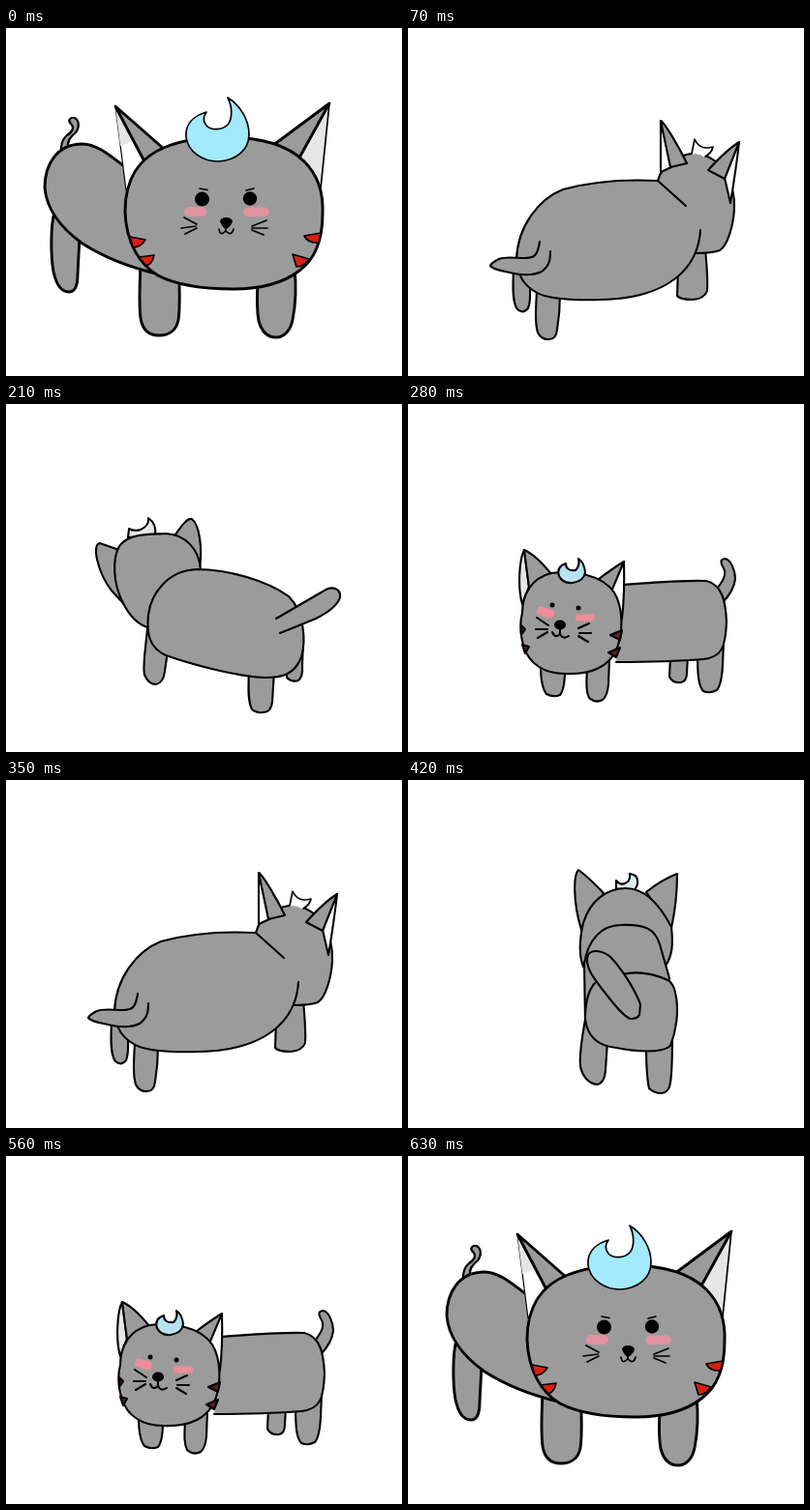
Animation, 409 px wide and 360 px high, one loop 0.7 s. Source, as an HTML page:

```html
<!DOCTYPE html>
<html lang="en">
<head>
<meta charset="utf-8">
<title>Turning cat</title>
<style>
  html, body { margin: 0; width: 100%; height: 100%; overflow: hidden; background: #fff; }
  svg { display: block; width: 409px; height: 360px; }
  .pose { opacity: 0; fill: #9b9b9b; stroke: #000; stroke-width: 2.1; stroke-linecap: round; stroke-linejoin: round; }
  #front { stroke-width: 2.9; opacity: 1; }
  .white { fill: #fff; }
  .pale { fill: #e6e6e6; }
  .line { fill: none; }
  .thin { stroke-width: 1.7; }
  .hair { stroke-width: 1.2; }
  .ink { fill: #000; stroke: none; }
  .blush { fill: #e2929f; stroke: none; }
  .bare { stroke: none; }
</style>
</head>
<body>
<svg viewBox="0 0 409 360">
  <g id="front" class="pose">
    <path d="M50 190C46 205 46 235 49 252C52 266 57 273 65 273C72 273 74 266 74 255L76 216"/>
    <path d="M139 244C138 270 137 285 139 300C141 313 148 318 158 318C168 318 176 313 178 302C180 290 179 275 179 260"/>
    <path d="M260 263C259 280 259 292 261 303C264 314 270 320 279 320C288 320 294 312 296 302C299 287 300 268 298 248"/>
    <path style="stroke-width:2.2" d="M57 130C56 120 58 115 63 111C69 107 71 103 67 99C63 95 67 92 71 93C76 96 76 103 72 108C66 113 63 117 64 125"/>
    <path d="M122 143C105 130 93 120 79 120C52 120 40 142 40 165C42 190 61 210 79 223C104 239 130 248 155 254"/>
    <path class="white hair" d="M113 81L124 168L145 140Z"/>
    <path class="pale bare" d="M113 81L118 122L132 117Z"/>
    <path d="M113 81L163 125L145 142Z"/>
    <path class="pale thin" d="M334 78L302 134L325 166Z"/>
    <path d="M334 78L275 122L302 136Z"/>
    <path d="M123 190C123 150 142 132 165 123C185 115 205 113 226 113C262 113 290 120 308 138C322 152 328 170 327 192C327 222 318 240 303 251C285 265 262 270 235 270C205 270 178 267 157 256C138 245 124 222 123 190Z"/>
    <path class="thin" fill="#a3eaff" d="M207 87C193 91 185 100 186 113C188 128 203 138 219 138C238 137 251 126 251 110C251 95 242 80 229 72C234 82 234 94 229 100C223 106 212 106 207 101C203 96 204 91 207 87Z"/>
    <g class="ink">
      <circle cx="202.500" cy="177" r="7.500"/>
      <circle cx="252" cy="176.500" r="7.200"/>
      <path d="M221 200Q222 196 227 196Q233 196 234 200Q232 206 227 208Q223 206 221 200Z"/>
    </g>
    <g class="blush">
      <rect x="184" y="185" width="23" height="10" rx="5"/>
      <rect x="245" y="185.500" width="27" height="9.500" rx="4.700"/>
    </g>
    <path class="line thin" d="M200 166L208 167.500M248 168L256 166M227 207V210M220 208Q221 216 227 210Q233 216 235 208M184 196L197 203M181 207L196 205M185 213L197 207M254 205L269 199M254 207L270 207M254 209L266 214"/>
    <path class="thin" fill="#d91f10" d="M128 216L144 219Q139 227 131 227ZM137 237L153 235Q151 244 145 246ZM325 212L308 215Q312 223 323 222ZM296 234L313 239Q308 247 300 247Z"/>
  </g>

  <g id="backRight" class="pose">
    <path d="M109 250C108 270 108 285 113 291Q119 296 124 290C127 283 126 277 126 265"/>
    <path d="M133 272C132 290 131 305 134 315Q138 323 146 322Q153 322 154 312C156 300 157 290 157 275"/>
    <path d="M281 232C278 255 278 270 278 277Q281 281 294 281Q306 280 309 272C310 255 308 245 307 226"/>
    <path d="M258 158C262 140 285 128 300 130C325 135 338 160 337 187C336 205 330 225 322 230C315 233 305 233 295 233"/>
    <path class="bare" d="M258 158L287 184L302 209L296 233L250 220Z"/>
    <path d="M287 184L258 158C220 156 185 160 160 167C135 177 113 205 112 240C113 262 128 276 150 279C170 282 215 283 240 276C275 267 300 245 302 209"/>
    <path class="white" d="M261 96L261 149L272 144Z"/>
    <path d="M261 96C265 98 280 123 288 140L271 144Z"/>
    <path class="white" d="M342 118L327 155L333 181Q339 145 342 118Z"/>
    <path d="M342 118Q329 126 310 147L327 156Z"/>
    <path class="white bare" d="M293 131L296 115Q301 127 315 123Q314 129 307 134Q300 129 293 131Z"/>
    <path class="line thin" d="M293 130L296 115Q301 127 315 123Q314 129 307 133"/>
    <path d="M136 221C134 236 130 238 120 238C112 238 100 236 94 239Q86 243 85 246C88 250 96 251 105 253C118 256 130 256 138 252C146 246 147 240 147 231"/>
  </g>

  <g id="back" class="pose">
    <path d="M183 248C179 270 177 285 178 296C180 307 187 314 195 315Q203 314 204 300L206 270"/>
    <path d="M246 274C246 297 247 310 249 319Q254 324 262 324Q270 323 271 313C273 300 273 285 273 265"/>
    <path d="M176 93C171 98 170 125 179 155L202 117Q187 101 176 93Z"/>
    <path d="M278 97Q262 103 246 116L272 153C276 135 278 115 278 97Z"/>
    <path fill="#d9edf3" d="M215 115L215 104Q219 109 224 107Q230 105 229 97Q237 98 237 104Q238 109 233 115Z"/>
    <path d="M181 193C176 180 177 165 181 148C188 125 205 112 225 112C243 112 259 127 272 152C274 170 273 182 266 192"/>
    <path d="M183 250L182 190C186 165 200 150 220 150C245 149 255 154 260 170L270 205L262 225"/>
    <path d="M222 201C237 197 257 201 270 208Q275 213 276 220C281 240 276 262 271 275C262 283 235 281 215 277C195 275 185 265 183 247C183 230 186 218 193 210"/>
    <path d="M186 181C190 174 203 177 210 184C222 197 235 218 240 232L239 243Q237 247 230 247C225 246 215 235 205 222C193 207 181 192 186 181Z"/>
  </g>

  <g id="backLeft" class="pose">
    <path d="M146 232C144 255 141 270 143 280Q147 290 155 290Q163 288 164 276L167 256"/>
    <path d="M251 276C250 295 250 308 254 316Q259 320 265 319Q274 319 275 308L277 276"/>
    <path d="M289 268L290 283Q295 288 302 286Q307 282 306 270L307 245"/>
    <path d="M117 151L97 144C88 145 95 175 109 193L121 206Z"/>
    <path d="M175 135C182 125 187 118 192 119C200 125 203 150 200 170Z"/>
    <path class="pale" d="M126 138L127 129Q132 132 139 130Q148 126 147 118Q156 124 154 136Z"/>
    <path d="M146 231Q131 226 121 206C110 185 110 160 117 147C127 133 150 135 165 134C185 135 200 150 201 172"/>
    <path d="M197 171C230 171 270 183 292 199C308 215 310 245 305 262C298 280 285 283 268 283C235 282 185 267 165 260C148 252 145 238 147 218C150 195 168 172 197 171Z"/>
    <path d="M279 222L327 194C337 187 346 191 345 200C342 210 330 217 320 222L283 237"/>
  </g>

  <g id="frontLeft" class="pose">
    <path d="M271 261L270 282Q273 289 282 288Q288 287 288 278L289 260"/>
    <path d="M299 258C299 280 300 292 305 297Q312 300 319 296Q324 290 325 270L326 246"/>
    <path d="M319 191C328 180 329 174 325 168Q321 161 327 160C333 160 338 172 338 181Q336 194 326 204"/>
    <path d="M222 187C250 185 285 182 308 183C325 187 328 205 329 225C328 250 325 262 305 264C280 266 245 267 215 267"/>
    <path d="M137 270C137 285 139 295 143 300Q150 304 157 301Q162 295 162 275"/>
    <path d="M185 274C184 290 184 298 187 304Q194 310 201 306Q206 302 207 290L208 264"/>
    <path class="pale" d="M120 151C115 160 113 190 118 207L125 189Z"/>
    <path d="M120 151Q132 156 148 176L125 190Z"/>
    <path class="white" d="M223 163L209 192L221 222Q224 195 223 163Z"/>
    <path d="M223 163Q213 169 197 181L210 194Z"/>
    <path d="M118 216C118 198 127 180 148 175C170 172 200 176 213 195C222 210 223 235 215 255C205 275 185 280 162 279C140 279 125 268 120 252C116 240 115 228 118 216Z"/>
    <path fill="#b9e2f2" d="M163 165Q153 168 156 178Q160 186 170 185Q182 183 183 174Q182 164 176 160Q178 167 173 172Q163 173 163 165Z"/>
    <g class="ink">
      <circle cx="149" cy="208" r="2.500"/>
      <circle cx="176" cy="211" r="2.500"/>
      <ellipse cx="157" cy="228.500" rx="6" ry="5"/>
    </g>
    <g class="blush" style="fill:#ef8e98">
      <rect x="133" y="211" width="18" height="9" rx="4" transform="rotate(16 142 215)"/>
      <rect x="173" y="217.500" width="20" height="7" rx="3"/>
    </g>
    <path class="line" d="M157 232V238M149 236Q152 243 157 238Q160 244 166 240M133 221L145 229M132 233L144 233M134 242L144 236M176 232L187 227M177 237L189 237M176 240L186 246"/>
    <path fill="#5c211c" d="M117 229L121 233L117 239ZM118 249L125 251L121 258ZM221 234L209 239L219 244ZM219 252L207 257L215 262Z"/>
  </g>
</svg>
<script>
  const step = 70;
  const turn = ["backRight", "back", "backLeft", "frontLeft"];
  const order = ["front", ...turn, ...turn, "front"];

  // Each pose is shown only during its own steps, with hard cuts.
  for (const pose of document.querySelectorAll(".pose")) {
    const frames = [...order, order[0]].map((name, i) => ({
      opacity: name === pose.id ? 1 : 0,
      offset: i / order.length,
      easing: "steps(1, end)"
    }));
    pose.animate(frames, { duration: step * order.length, iterations: Infinity });
  }
</script>
</body>
</html>
```
